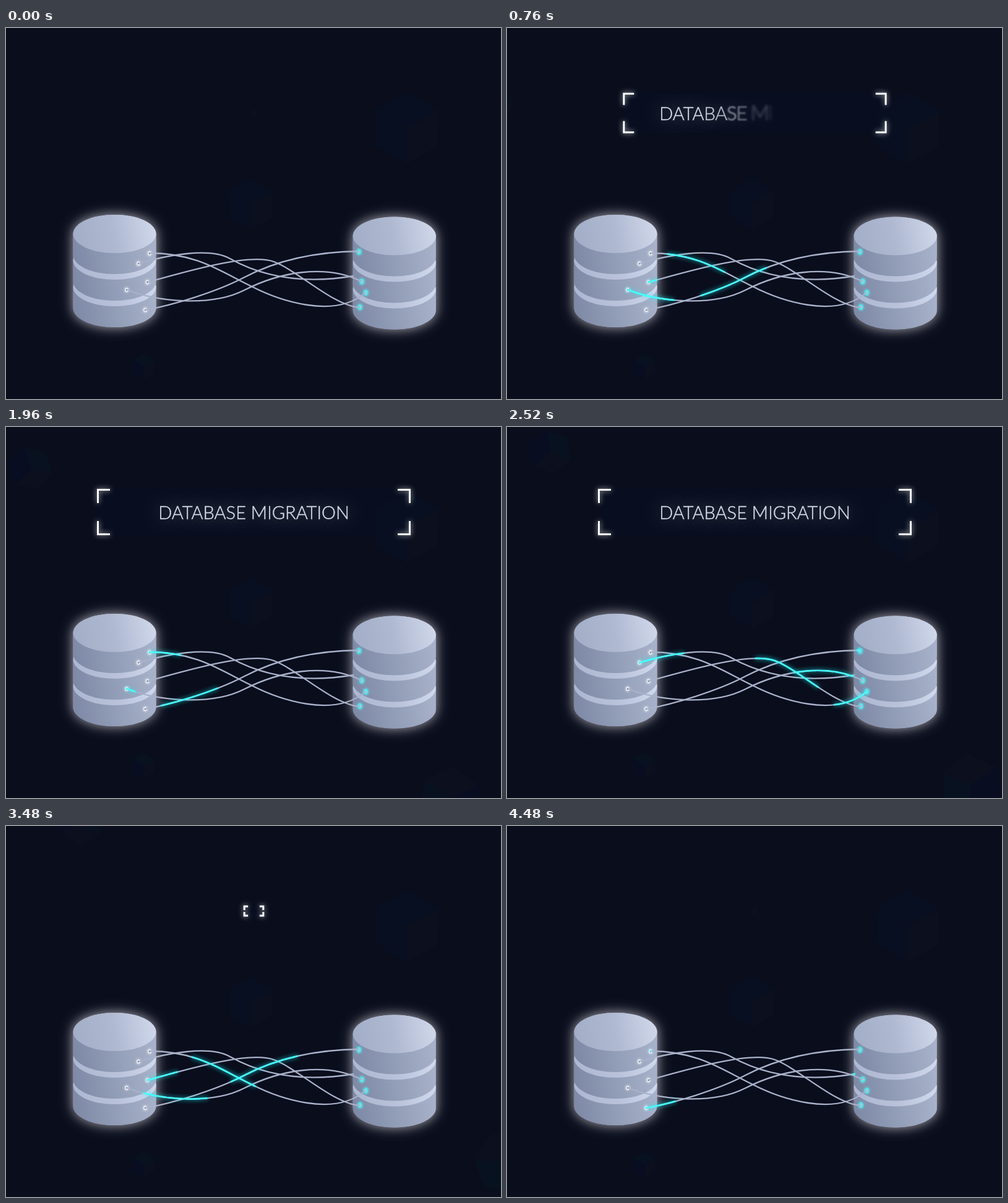
Animation, 800 px wide and 600 px high, one loop 4.52 s. Source, as an HTML page with a canvas:

```html
<!DOCTYPE html>
<html lang="en">
<head>
<meta charset="utf-8">
<title>Database migration</title>
<style>
html, body { margin: 0; width: 100%; height: 100%; overflow: hidden; background: #090d1c; }
canvas { display: block; }
</style>
</head>
<body>
<canvas id="stage" width="800" height="600"></canvas>
<script>
const ctx = document.getElementById('stage').getContext('2d');
const LOOP = 4520, CYCLE = 1320, TAU = Math.PI * 2;
const TITLE = 'DATABASE MIGRATION';
const FONT = '300 29px Lato, "Open Sans", sans-serif';
const CX = 400.5, CY = 137.5;

const clamp = v => Math.min(1, Math.max(0, v));
const span = (t, start, length) => clamp((t - start) / length);
const cubicInOut = u => u < .5 ? 4 * u ** 3 : 1 - 4 * (1 - u) ** 3;
// Slight pull outwards before shrinking
const anticipate = u => u < .5 ? 2 * u * u * (3.6 * u - .8) : cubicInOut(u);
const softInOut = u => .5 * u + .25 * (1 - Math.cos(Math.PI * u));

function wire(start, d) {
  const el = document.createElementNS('http://www.w3.org/2000/svg', 'path');
  el.setAttribute('d', d);
  return { start, path: new Path2D(d), length: el.getTotalLength() };
}
const wires = [
  wire(520, 'M232 364C310 364 350 396 397 418C440 440 530 472 581 428'),
  wire(1035, 'M214 381C258 368 328 354 362 373S460 418 562 401'),
  wire(720, 'M229 411C300 391 395 364 433 378S530 450 572 452'),
  wire(600, 'M195 423C240 442 330 452 385 424S515 380 575 410'),
  wire(400, 'M225 456C270 448 340 427 385 403.3S490 362 570 361')
];
const sources = [[232, 364.5], [214, 381], [228.5, 411], [195, 423.5], [225, 456]];
const sinks = [[570.5, 362], [575, 410], [581.5, 428], [572, 451.5]];

const navy = ['#080f20', '#080f20', '#0c0f1d'];
const tinted = ['#08111f', '#080d22', '#0c0f1d'];

function cube(x, y, r, angle, colors) {
  ctx.save();
  ctx.translate(x, y);
  ctx.rotate(angle * Math.PI / 180);
  // faces: top, left, right
  [-150, 90, -30].forEach((from, i) => {
    ctx.beginPath();
    ctx.moveTo(0, 0);
    for (let k = 0; k < 3; k++) {
      const a = (from + k * 60) * Math.PI / 180;
      ctx.lineTo(r * Math.cos(a), r * Math.sin(a));
    }
    ctx.fillStyle = colors[i];
    ctx.fill();
  });
  ctx.restore();
}

function cubes(t) {
  const d = t - 1960;
  cube(648, 162, 58, 2, navy);
  cube(396, 285, 41, 1, navy);
  cube(222, 548, 21, 1, tinted);
  cube(40 + .0535 * d, 67 - .047 * d, 36, 41 + .0165 * d, tinted);
  cube(717 + .058 * d, 600 - .0365 * d, 51, 246 - .0187 * d, tinted);
}

function cylinder(x, y) {
  const rx = 67, ry = 31, h = 34, step = 43;
  const outline = (top, height) => {
    ctx.beginPath();
    ctx.ellipse(x, top, rx, ry, 0, Math.PI, TAU);
    ctx.ellipse(x, top + height, rx, ry, 0, 0, Math.PI);
    ctx.closePath();
  };
  const blend = (cy, ...colors) => {
    const g = ctx.createLinearGradient(x - rx, cy + 12, x + rx, cy - 12);
    colors.forEach((c, i) => g.addColorStop(i / (colors.length - 1), c));
    return g;
  };
  ctx.save();
  ctx.fillStyle = '#8f9ab4';
  outline(y, 2 * step + h);
  ctx.shadowBlur = 20;
  ctx.shadowColor = 'rgba(235,230,235,.75)';
  ctx.fill();
  ctx.restore();
  for (let i = 2; i >= 0; i--) {
    const top = y + i * step;
    outline(top, h);
    ctx.fillStyle = blend(top + h / 2, '#7e89a6', '#939eb8', '#a9b3cb');
    ctx.fill();
    ctx.beginPath();
    ctx.ellipse(x, top, rx, ry, 0, 0, TAU);
    ctx.fillStyle = i ? blend(top, '#acb7d1', '#b9c2da', '#d2daee')
                      : blend(top, '#a2adc7', '#afb9d1', '#d1d8eb');
    ctx.fill();
  }
}

function dot(x, y, rx, ry, color) {
  ctx.beginPath();
  ctx.ellipse(x, y, rx, ry, 0, 0, TAU);
  ctx.fillStyle = color;
  ctx.fill();
}

function sockets() {
  ctx.save();
  ctx.shadowBlur = 4;
  ctx.shadowColor = '#fff';
  sources.forEach(([x, y]) => dot(x, y, 2.8, 3.6, '#e9edf5'));
  ctx.shadowColor = '#4ff';
  sinks.forEach(([x, y]) => dot(x, y, 3.8, 4.8, '#5adfe6'));
  ctx.restore();
  sources.forEach(([x, y]) => dot(x, y, 1.2, 1.6, '#6d7894'));
  sinks.forEach(([x, y]) => dot(x, y, 1.6, 2.2, '#9fd3e2'));
}

function pulses(t) {
  ctx.save();
  ctx.strokeStyle = '#4ff';
  ctx.lineWidth = 2.6;
  ctx.lineCap = 'round';
  ctx.shadowBlur = 7;
  ctx.shadowColor = '#2ee';
  for (const { start, path, length } of wires) {
    for (let at = start; at < t; at += CYCLE) {
      const head = softInOut(span(t, at, 650)) * length;
      const tail = softInOut(span(t, at + 165, 650)) * length;
      if (head - tail < .1) continue;
      ctx.setLineDash([head - tail, length * 2]);
      ctx.lineDashOffset = -tail;
      ctx.stroke(path);
    }
  }
  ctx.restore();
}

function frame(t) {
  const size = cubicInOut(span(t, 80, 1040)) - anticipate(span(t, 3180, 380));
  const hx = 8 + 245.5 * size, hy = 8 + 29.5 * size;
  const closed = size < .01, inset = closed ? 2 : 0;
  ctx.fillStyle = closed ? '#0b101d' : 'rgba(8,15,34,.6)';
  ctx.fillRect(CX - hx + inset, CY - hy + inset, 2 * (hx - inset), 2 * (hy - inset));
  if (t < 40 || t >= 3960) return;

  ctx.save();
  ctx.strokeStyle = '#fff';
  ctx.lineWidth = 3;
  ctx.shadowBlur = 9;
  ctx.shadowColor = 'rgba(255,255,255,.8)';
  ctx.beginPath();
  if (closed) {
    ctx.moveTo(394.5, 139);
    ctx.lineTo(394.5, 144.3);
    ctx.lineTo(407.3, 144.3);
    ctx.lineTo(407.3, 131);
  } else {
    const k = hx / 253.5, ax = Math.max(6, 19.5 * k), ay = Math.max(6, 21.5 * k);
    for (const sx of [-1, 1]) for (const sy of [-1, 1]) {
      const x = CX + sx * (hx - 1.5), y = CY + sy * (hy - 1.5);
      ctx.moveTo(x - sx * ax, y);
      ctx.lineTo(x, y);
      ctx.lineTo(x, y - sy * ay);
    }
  }
  ctx.stroke();
  ctx.restore();
}

function title(t) {
  ctx.save();
  ctx.font = FONT;
  ctx.textAlign = 'center';
  ctx.fillStyle = ctx.strokeStyle = '#d4daea';
  ctx.lineWidth = .5;
  const width = s => ctx.measureText(s).width;
  const left = CX - width(TITLE) / 2;
  [...TITLE].forEach((char, i) => {
    const shown = span(t, 485 + 25 * i, 200) * (1 - span(t, 2830 + 22.5 * i, 24));
    if (!shown) return;
    const w = width(char), off = 1 - shown;
    ctx.save();
    ctx.translate(left + width(TITLE.slice(0, i + 1)) - w / 2, 148.5);
    ctx.scale(1 + .2 * off, 1 + .2 * off);
    ctx.globalAlpha = shown;
    if (off) ctx.filter = `blur(${2.5 * off}px)`;
    ctx.shadowBlur = 22;
    ctx.shadowColor = 'rgba(255,255,255,.4)';
    ctx.fillText(char, 0, 0);
    ctx.shadowColor = 'transparent';
    ctx.strokeText(char, 0, 0);
    ctx.restore();
  });
  ctx.restore();
}

function draw(t) {
  ctx.fillStyle = '#090d1c';
  ctx.fillRect(0, 0, 800, 600);
  cubes(t);
  cylinder(175.5, 333);
  cylinder(627.7, 336.5);
  sockets();
  ctx.strokeStyle = '#a9b2ca';
  ctx.lineWidth = 2.3;
  wires.forEach(w => ctx.stroke(w.path));
  pulses(t);
  frame(t);
  title(t);
}

const begin = performance.now();
function tick() {
  draw((performance.now() - begin) % LOOP);
  requestAnimationFrame(tick);
}
tick();
</script>
</body>
</html>
```
